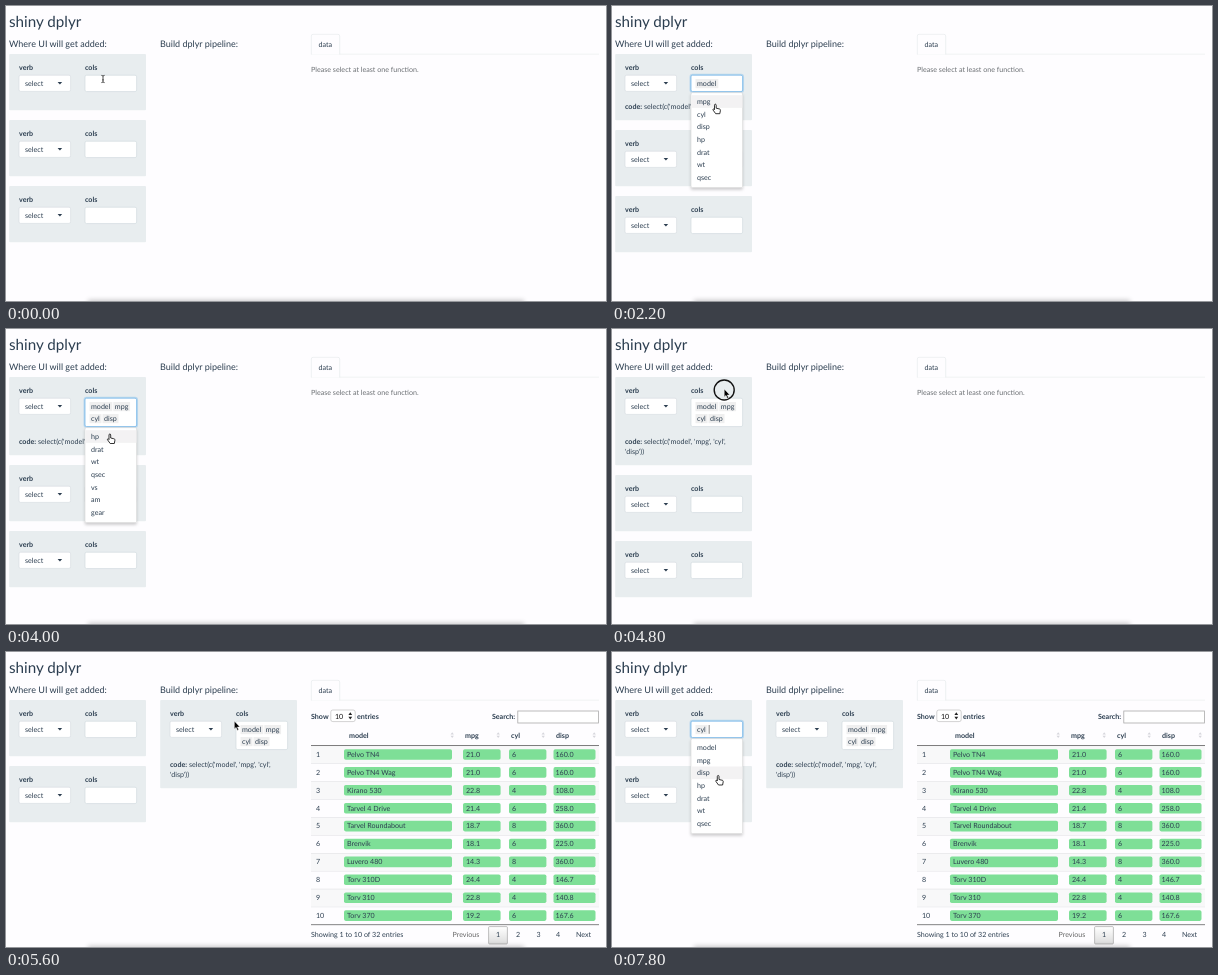
An HTML page that plays this animation: 600x295 px, repeating every 8000 ms.

```html
<!DOCTYPE html>
<html lang="en">
<head>
<meta charset="utf-8">
<title>shiny dplyr</title>
<style>
html, body { margin: 0; width: 100%; height: 100%; overflow: hidden; background: #fefdff; }
svg { display: block; font: 7.12px Lato, sans-serif; text-rendering: geometricPrecision; }
text { fill: #2c3e50; white-space: pre; }
</style>
</head>
<body>
<svg id="stage" width="600" height="295" viewBox="0 0 600 295"></svg>
<script>
const LOOP = 8000;
const COLS = ['model', 'mpg', 'cyl', 'disp', 'hp', 'drat', 'wt', 'qsec', 'vs', 'am', 'gear', 'carb'];
const WORD_WIDTH = { model: 19.8, mpg: 13.8, cyl: 9, disp: 13 };
const ROWS = [
  ['Pelvo TN4', '21.0', 6, '160.0'], ['Pelvo TN4 Wag', '21.0', 6, '160.0'],
  ['Kirano 530', '22.8', 4, '108.0'], ['Tarvel 4 Drive', '21.4', 6, '258.0'],
  ['Tarvel Roundabout', '18.7', 8, '360.0'], ['Brenvik', '18.1', 6, '225.0'],
  ['Luvero 480', '14.3', 8, '360.0'], ['Torv 310D', '24.4', 4, '146.7'],
  ['Torv 310', '22.8', 4, '140.8'], ['Torv 370', '19.2', 6, '167.6']
];

const text = (x, y, s, attrs = '') => `<text x="${x}" y="${y}" ${attrs}>${s}</text>`;
const bold = (x, y, s, attrs = '') => text(x, y, s, 'font-weight="700" ' + attrs);
const rect = (x, y, w, h, fill, attrs = '') =>
  `<rect x="${x}" y="${y}" width="${w}" height="${h}" fill="${fill}" ${attrs}/>`;
const path = (d, attrs) => `<path d="${d}" ${attrs}/>`;
const group = (x, y, s, attrs = '') => `<g transform="translate(${x} ${y})" ${attrs}>${s}</g>`;

// Extra height of the column box once its content wraps to a second row.
const extraRow = p => p.picks.length > 2 ? 12 : p.picks.length === 2 && p.open ? 9.5 : 0;
const codeRows = p => p.code > 3 ? 2 : p.code > 0 ? 1 : 0;
const panelHeight = p => 56.2 + extraRow(p) + codeRows(p) * 10;

function chips(p) {
  let out = '', x = 85, y = 79.8;
  p.picks.forEach((word, i) => {
    if (i === 2) { x = 85; y += 12; }
    const w = WORD_WIDTH[word];
    out += rect(x - 1.5, y - 6.8, w + 3, 9.2, '#efefef') + text(x, y, word, 'fill="#303030"');
    x += w + 4;
  });
  if (p.caret) {
    if (p.picks.length === 2) { x = 85; y += 10; }
    out += rect(x - 1.2, y - 6.8, .6, 8.8, '#333');
  }
  return out;
}

function codeText(p) {
  if (!p.code) return '';
  const words = p.picks.slice(0, p.code).map(w => `'${w}'`);
  const y = 102.5 + extraRow(p);
  const first = words.slice(0, 3).join(', '), rest = words.slice(3).join(', ');
  return text(13, y, `<tspan font-weight="700">code:</tspan> select(c(${first}${rest ? ',' : '))'}`) +
    (rest ? text(13, y + 10, rest + '))') : '');
}

// Panel contents sit in the coordinates of the top left panel.
function panel(p) {
  const border = p.open ? '#66afe9' : '#d3dbe0';
  const h = 16.4 + extraRow(p);
  return rect(3.2, 48, 136.8, panelHeight(p), '#e8edef', 'rx="1"') +
    bold(13, 64.4, 'verb') + bold(79, 64.4, 'cols') +
    rect(13, 69.2, 51.6, 16.2, '#fff', 'rx="1.6" stroke="#d3dbe0" stroke-width=".6"') +
    text(19, 79.8, 'select') + path('M51.6 76h4.6l-2.3 2.5z', 'fill="#2c3e50"') +
    (p.open ? rect(78.3, 68.4, 53, h + 1.4, 'none', 'rx="2.2" stroke="#66afe9" stroke-opacity=".35" stroke-width="1.5"') : '') +
    rect(79, 69.2, 51.6, h, '#fff', `rx="1.6" stroke="${border}" stroke-width=".7"`) +
    chips(p) + codeText(p);
}

function dropdown(p, hot) {
  const top = 86.6 + extraRow(p);
  const items = COLS.filter(c => !p.picks.includes(c)).slice(0, 7);
  return rect(79, top, 51.6, 95, '#fff', 'rx="1.4" stroke="#ccc" stroke-width=".5" filter="url(#shadow)"') +
    items.map((c, i) => {
      const y = top + 2.6 + i * 12.65;
      return (i === hot ? rect(79.3, y, 51, 12.65, '#f3f2f3') : '') + text(85, y + 8.8, c, 'fill="#303030"');
    }).join('');
}

function cursor([kind, x, y]) {
  const shapes = {
    arrow: path('M0 0v8l1.8-1.6 1.3 3 1.3-.6-1.3-2.8h2.6z', 'fill="#000" stroke="#fff" stroke-width=".5"'),
    hand: path('M-1 1c0-1.4 1.7-1.4 1.7 0v3l3 .7c1 .2 1.3.7 1.2 1.6l-.6 3.2H.2l-2.6-3.6c-.5-.9.4-1.5 1-.9l.4.5z',
      'fill="#fff" stroke="#000" stroke-width=".8" stroke-linejoin="round"'),
    beam: path('M-1.6-3.6q1.6 0 1.6 1v5.2q0 1-1.6 1M1.6-3.6q-1.6 0-1.6 1M0 2.6q0 1 1.6 1M-.8.9h1.6',
      'fill="none" stroke="#222" stroke-width=".8"')
  };
  return group(x, y, shapes[kind]);
}

function table() {
  const bars = [[338, 108, 341], [457, 37.6, 460], [503, 37.4, 506], [547.5, 42, 549.5]];
  const line = (y, c, w) => rect(305, y, 288, w, c);
  const sorter = x => path(`M${x} 82.6l1.7-2.3 1.7 2.3zM${x} 83.8l1.7 2.3 1.7-2.3z`, 'fill="#d6d6dc"');
  let out = bold(305, 66.5, 'Show') +
    rect(324.8, 58, 24.4, 11.6, '#fff', 'rx="2" stroke="#b5b5b5" stroke-width=".6"') +
    text(329, 66.5, '10', 'style="fill:#111"') +
    path('M342.4 63l1.9-2.8 1.9 2.8zM342.4 64.8l1.9 2.8 1.9-2.8z', 'fill="#222"') +
    bold(351, 66.5, 'entries') + bold(509, 67, 'Search:', 'text-anchor="end"') +
    rect(511.8, 59, 80.6, 12, '#fff', 'stroke="#aaa" stroke-width=".8"');
  ['model', 'mpg', 'cyl', 'disp'].forEach((c, i) => {
    out += bold([343, 459, 505, 550][i], 86, c) + sorter([444.5, 490.5, 535.5, 586.5][i]);
  });
  ROWS.forEach((row, i) => {
    const y = 93.6 + i * 17.9;
    out += rect(305, y, 288, 17.9, i % 2 ? '#fefdff' : '#f8f8f9') + line(y, '#dddde0', .5) +
      text(310, y + 11.2, i + 1) +
      bars.map(([x, w, tx], j) => rect(x, y + 3.6, w, 10.6, '#7edf97', 'rx="1.8"') +
        text(tx, y + 11.2, row[j])).join('');
  });
  out += line(93.2, '#333', .6) + line(272.5, '#333', .6) +
    text(305, 285.4, 'Showing 1 to 10 of 32 entries') +
    text(446.5, 285.4, 'Previous', 'style="fill:#666"') +
    rect(482.6, 274.6, 18.8, 17.4, 'url(#page)', 'rx="1" stroke="#979797" stroke-width=".6"');
  [490, 510, 530.5, 550].forEach((x, i) => out += text(x, 285.4, i + 1));
  return out + text(570, 285.4, 'Next');
}

const DEFS = `<defs>
  <filter id="shadow" x="-20%" y="-10%" width="140%" height="125%"><feDropShadow dx="0" dy="2" stdDeviation="1.8" flood-opacity=".2"/></filter>
  <filter id="blur" x="-10%" y="-200%" width="120%" height="500%"><feGaussianBlur stdDeviation="2.4"/></filter>
  <linearGradient id="page" x2="0" y2="1"><stop stop-color="#fff"/><stop offset="1" stop-color="#dcdcdc"/></linearGradient>
</defs>`;

const page = rect(0, 0, 600, 295, '#fefdff') +
  text(3, 20.6, 'shiny dplyr', 'font-size="15.2"') +
  text(3, 40.8, 'Where UI will get added:', 'font-size="9.02"') +
  text(154, 40.8, 'Build dplyr pipeline:', 'font-size="9.02"') +
  rect(305, 47.8, 288, .6, '#e6eaec') +
  path('M305.3 48.4V30q0-1.7 1.7-1.7h25q1.7 0 1.7 1.7v18.4', 'fill="#fefdff" stroke="#e2e7ea" stroke-width=".6"') +
  text(312.5, 40.8, 'data');

const EMPTY = { picks: [], code: 0 };

function draw(s) {
  const first = { picks: COLS.slice(s.from, s.to), code: s.code, open: s.open, caret: s.caret };
  let out = DEFS + page, y = 0;
  for (let i = 0; i < (s.dropped ? 2 : 3); i++) {
    const p = i ? EMPTY : first;
    out += group(0, y, panel(p));
    y += panelHeight(p) + 9.8;
  }
  if (s.dropped) out += group(151, 0, panel({ picks: COLS.slice(0, 4), code: 4 }));
  out += s.table ? table() : text(305, 65.8, 'Please select at least one function.', 'style="fill:#6b6f73"');
  out += rect(82, 294, 436, 8, '#000', 'opacity=".22" filter="url(#blur)"');
  if (s.open) out += dropdown(first, s.hot);
  if (s.drag) out += group(...s.drag, panel(first), 'opacity=".65"');
  if (s.ring) out += `<circle cx="${s.at[1]}" cy="${s.at[2] + 1}" r="10" fill="none" stroke="#111" stroke-width="1.4"/>`;
  return out + cursor(s.at);
}

// Each step overrides part of the state from its time on.
const STEPS = [
  [0, { from: 0, to: 0, code: 0, hot: 0, at: ['beam', 97, 73] }],
  [200, { at: ['beam', 91, 77] }],
  [600, { open: true, caret: true }],
  [1000, { at: ['beam', 96, 82] }],
  [1200, { at: ['hand', 102, 90], caret: false }],
  [1600, { to: 1, at: ['hand', 103, 93] }],
  [1800, { code: 1 }],
  [2000, { at: ['hand', 103.5, 96] }],
  [2200, { at: ['hand', 103.5, 98.2] }],
  [2600, { to: 2, code: 2 }],
  [3000, { to: 3, code: 3, at: ['hand', 103.5, 100] }],
  [3200, { at: ['arrow', 104, 97.5] }],
  [3600, { at: ['hand', 104, 105] }],
  [4000, { to: 4 }],
  [4200, { code: 4 }],
  [4400, { at: ['arrow', 109, 84] }],
  [4600, { open: false, at: ['arrow', 112, 62] }],
  [4800, { ring: true, at: ['arrow', 112.2, 60] }],
  [5000, { drag: [133, 4], at: ['arrow', 245, 64] }],
  [5200, { drag: null, ring: false, dropped: true, to: 0, code: 0, at: ['arrow', 228.3, 69] }],
  [5600, { table: true }],
  [6000, { at: ['arrow', 180, 72] }],
  [6200, { at: ['arrow', 125, 75] }],
  [6400, { at: ['beam', 98, 77] }],
  [6600, { open: true, caret: true }],
  [7000, { at: ['hand', 100, 92], caret: false }],
  [7200, { at: ['hand', 104, 108], hot: 1 }],
  [7400, { at: ['hand', 106, 122], hot: 2 }],
  [7600, { from: 2, to: 3, at: ['hand', 106.3, 123.5] }],
  [7800, { caret: true }]
];

const stage = document.getElementById('stage');
let shown = 0;
function tick(now) {
  const t = now % LOOP;
  const count = STEPS.filter(([start]) => start <= t).length;
  if (count !== shown) {
    shown = count;
    stage.innerHTML = draw(Object.assign({}, ...STEPS.slice(0, count).map(step => step[1])));
  }
  requestAnimationFrame(tick);
}
tick(performance.now());
</script>
</body>
</html>
```
